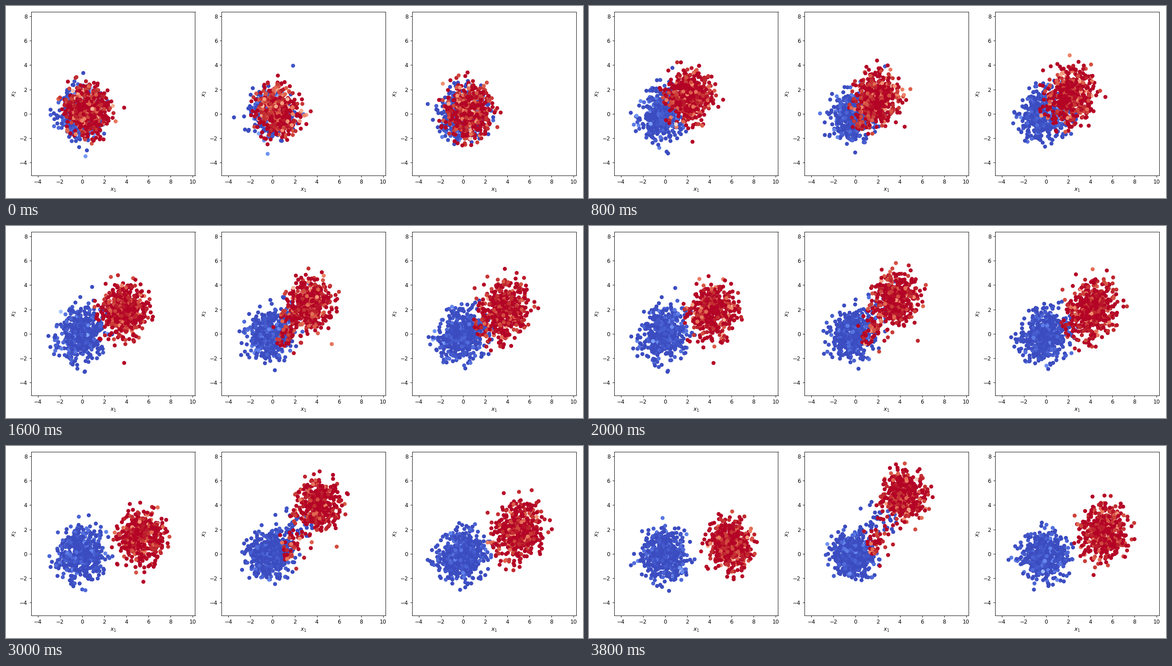
Animation, 1280 px wide and 427 px high, one loop 4 s. Source, as a matplotlib script:

```python
import numpy as np
import matplotlib.pyplot as plt
from matplotlib.animation import FuncAnimation

W, H, DPI = 1280, 427, 128
K = 2 / 3  # scales default point sizes to this dpi
FRAMES, INTERVAL = 20, 200
KEYS = (0, 4, 8, 13, 19)
BLUE, RED = 0, 1

plt.rcParams.update({
    "font.family": "DejaVu Sans", "font.size": 10 * K,
    "axes.linewidth": 0.8 * K, "axes.labelpad": 4 * K,
    "xtick.major.width": 0.8 * K, "ytick.major.width": 0.8 * K,
    "xtick.major.size": 3.5 * K, "ytick.major.size": 3.5 * K,
    "xtick.major.pad": 3.5 * K, "ytick.major.pad": 3.5 * K,
})

# Per panel: (hue, count, spread, centre at each key time)
STILL = [(0, 0), (-0.1, 0), (0, 0), (0, 0), (-0.05, -0.05)]
CLOUDS = [
    [(BLUE, 500, (0.97, 1.03), STILL),
     (RED, 500, (0.98, 1.03),
      [(0.45, 0.25), (2.15, 1.4), (3.75, 1.85), (5.1, 1.6), (5.85, 0.75)])],
    [(BLUE, 465, (0.95, 0.9), [(0, 0), (-0.2, -0.2), (-0.2, -0.1),
                               (-0.25, -0.05), (-0.2, -0.05)]),
     (BLUE, 35, (0.75, 0.7),
      [(0.2, 0.4), (0.8, 1.3), (1.4, 1.9), (1.8, 2.2), (2.0, 2.9)]),
     (RED, 45, (0.7, 0.85),
      [(0.4, 0.1), (0.9, 0.1), (1.4, 0.4), (1.7, 0.8), (1.9, 1.2)]),
     (RED, 455, (0.98, 1.0),
      [(0.45, 0.25), (1.95, 1.35), (3.3, 2.35), (4.0, 3.5), (4.35, 4.75)])],
    [(BLUE, 500, (1.03, 1.0), STILL),
     (RED, 500, (1.03, 1.12),
      [(0.45, 0.25), (2.1, 1.5), (3.6, 1.9), (4.75, 1.9), (5.15, 1.8)])],
]

# Outlying points: hue, then x, y at the start, two fifths in and the end
STRAYS = [
    [(BLUE, 0.1, 3.35, 0.9, 3.85, 0, 2.3),
     (BLUE, 0.3, -3.5, 0.25, -3.1, 0.35, -3.05),
     (BLUE, -2.85, -0.1, -2.5, -0.3, -3.1, -0.95),
     (RED, 3.8, 0.5, 6.4, 1.4, 8.1, 0),
     (RED, 0.9, -2.1, 3.8, -2.4, 6.2, -2.1)],
    [(BLUE, -3.5, -0.3, -3.0, 0.2, -2.7, -0.1),
     (BLUE, 1.85, 3.95, 3.3, 4.1, 4.2, 6.0),
     (BLUE, -0.45, -3.3, 0.2, -3.0, 0, -2.1),
     (RED, 3.45, 0.2, 6.0, 3.45, 6.5, 5.3),
     (RED, 3.05, -0.85, 5.35, -0.85, 5.4, 2.0),
     (RED, 0.8, 2.5, 3.0, 4.85, 3.65, 7.35)],
    [(BLUE, -3.2, 0.8, -2.75, -0.3, -3.4, -0.5),
     (BLUE, -0.8, -2.5, 0.2, -2.85, -1.1, -2.95),
     (RED, 3.4, 0.1, 6.8, 2.1, 8.0, 1.2),
     (RED, -0.4, 3.15, 2.2, 4.7, 4.2, 4.7),
     (RED, 0.2, 3.1, 4.85, 5.0, 5.85, 4.75),
     (RED, 3.1, -1.1, 4.35, -1.0, 4.3, -1.75)],
]


def cloud_path(rng, count, spread, centres):
    """Positions (frame, point, xy) of a slowly stirring Gaussian cloud."""
    a, b = rng.normal(size=(2, count, 2))
    u = np.linspace(0, 1, FRAMES)[:, None, None]
    z = a * np.cos(0.8 * u) + b * np.sin(0.8 * u)
    z += rng.normal(scale=0.07, size=z.shape)
    r = np.linalg.norm(z, axis=2, keepdims=True)
    z /= (1 + (r / 3.3) ** 4) ** 0.25
    z = z * spread * (1 + 0.06 * np.sin(np.pi * u))
    z[..., 1] += 0.15 * np.sin(np.pi * u[..., 0]) * z[..., 0]
    c = np.array(centres)
    mid = [np.interp(range(FRAMES), KEYS, c[:, k]) for k in (0, 1)]
    return z + np.stack(mid, axis=1)[:, None, :]


def stray_path(rng, xy):
    """A parabola in time through three places."""
    u = np.linspace(0, 1, FRAMES)[:, None]
    p2, p1, p0 = np.polyfit((0, 8 / 19, 1), np.reshape(xy, (3, 2)), 2)
    path = p2 * u ** 2 + p1 * u + p0
    return path[:, None, :]


def shades(rng, hue, count):
    """Scores that sit at the end of the colour scale, with a soft tail."""
    ease = np.exp(-np.arange(FRAMES) / 3)[:, None]
    scale = (0.06 if hue == RED else 0.035) + 0.025 * ease
    v = rng.exponential(size=(FRAMES, count)) - 0.65
    v = np.clip(v * scale, 0, 0.45)
    return 1 - v if hue == RED else v


def build_panel(seed):
    rng = np.random.default_rng(seed)
    parts = [(hue, cloud_path(rng, n, sd, mid))
             for hue, n, sd, mid in CLOUDS[seed]]
    parts += [(hue, stray_path(rng, xy)) for hue, *xy in STRAYS[seed]]
    parts.sort(key=lambda p: p[0])  # red lies over blue
    pos = np.concatenate([p for _, p in parts], axis=1)
    val = np.concatenate([shades(rng, h, p.shape[1]) for h, p in parts], axis=1)
    return pos, val


fig = plt.figure(figsize=(W / DPI, H / DPI), dpi=DPI, facecolor="white")
panels = [build_panel(i) for i in range(3)]
dots = []
for i, (pos, val) in enumerate(panels):
    ax = fig.add_axes([(55.5 + 422.5 * i) / W, 50 / H, 364 / W, 364 / H])
    ax.set(xlim=(-4.63, 10.22), ylim=(-5.08, 8.38),
           xticks=range(-4, 11, 2), yticks=range(-4, 9, 2),
           xlabel="$x_1$", ylabel="$x_2$")
    dots.append(ax.scatter(*pos[0].T, c=val[0], cmap="coolwarm", vmin=0, vmax=1,
                           s=36 * K ** 2, linewidths=1.5 * K))


def update(i):
    for dot, (pos, val) in zip(dots, panels):
        dot.set_offsets(pos[i])
        dot.set_array(val[i])
    return dots


anim = FuncAnimation(fig, update, frames=FRAMES, interval=INTERVAL,
                     repeat=True, repeat_delay=0)
plt.show()
```
